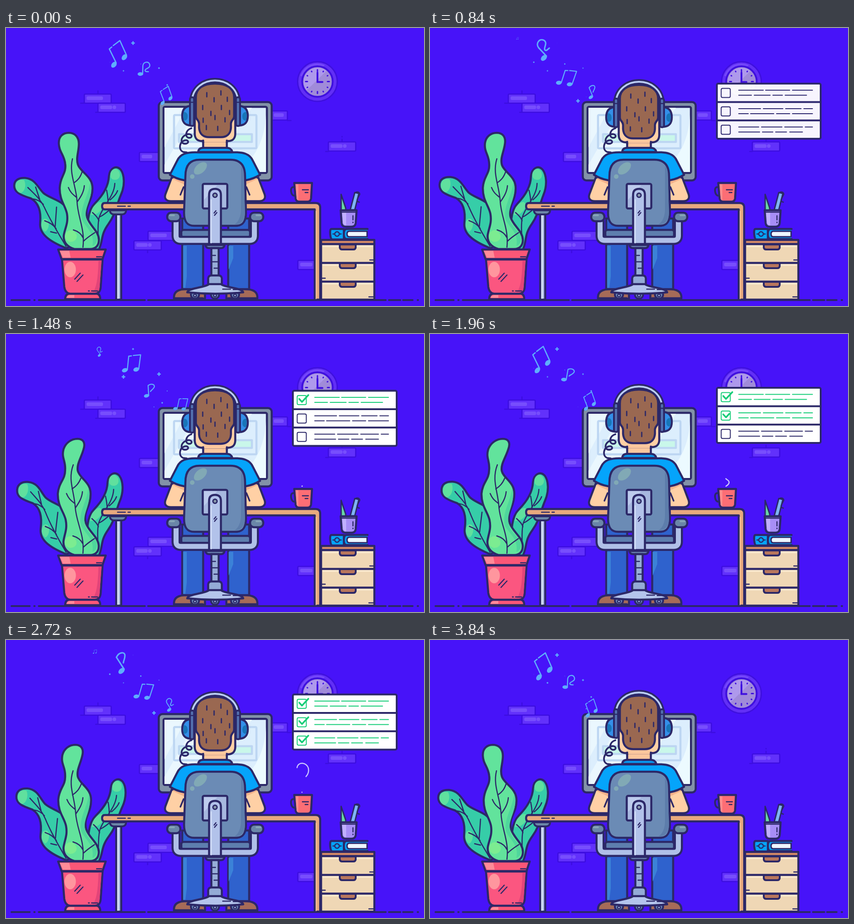
An HTML page for the animation above (3.88 s loop, 918 px wide and 610 px high).

```html
<!DOCTYPE html>
<html lang="en">
<head>
<meta charset="utf-8">
<title>Desk work</title>
<style>
html,body{margin:0;width:100%;height:100%;overflow:hidden;background:#4713f9}
svg{display:block;width:918px;height:610px}
.ink{stroke:#2c2868;stroke-width:4.5;stroke-linejoin:round;stroke-linecap:round;fill:none}
.thin{stroke-width:2.5}
.flat{stroke:none}
.note{stroke:#5eaefc;stroke-width:2.4;fill:none;stroke-linecap:round;stroke-linejoin:round}
.note ellipse{fill:#5eaefc;stroke:none}
.spark{stroke:#5eaefc;fill:#5eaefc}
</style>
</head>
<body>
<svg viewBox="0 0 918 610">
<rect width="918" height="610" fill="#4713f9"/>
<g id="bricks" fill="#6231fb" stroke="#3c0de0" stroke-width="2.6" stroke-linecap="round"></g>

<g stroke="#3f10df" stroke-linecap="round">
  <circle cx="684" cy="117.500" r="43.500" fill="#622ff6" stroke-width="3"/>
  <path d="M646 105A40 40 0 0 1 700 81L693 92A27 27 0 0 0 659 108Z" fill="#7447fa" stroke="none"/>
  <circle cx="684" cy="117.500" r="33.500" fill="#a08bd9" stroke-width="4"/>
  <path d="M660 137A31 31 0 0 1 704 94Z" fill="#ae99ec" stroke="none"/>
  <g id="ticks" stroke-width="3"></g>
  <path d="M684 98V118.500H695" fill="none" stroke-width="4"/>
</g>

<g class="ink">
  <path d="M12 597H52M62 597h1M72 597H305M312 597H834M841 597H866M872 597H893M904 597h1" stroke-width="4"/>
  <rect x="335.500" y="162.500" width="248" height="172" rx="8" fill="#8292a8"/>
  <rect x="346" y="173" width="227" height="145" rx="3" fill="#dceefd"/>
  <path class="flat" d="M348 175H395L348 262ZM348 300L420 175H540L445 316H348Z" fill="#eaf7fe"/>
  <path class="flat" d="M571 190V316H505C545 290 568 250 571 190Z" fill="#ecfaff"/>
  <g stroke="#bdd6f2"><rect x="369" y="191" width="181" height="73" rx="2"/>
  <rect x="380" y="233" width="160" height="17" fill="#c9f7ea"/></g>
</g>

<g id="notes"></g>
<g id="sparks" class="spark"></g>

<g class="ink">
  <path d="M407 220C394 224 392 240 402 241C412 241 408 229 396 234C382 240 383 254 393 254C404 254 401 243 391 247C380 252 379 268 389 272L397 273" stroke-width="3.800"/>
  <g id="arm"><path d="M364 328L350 365C347 374 352 380 362 380H398V330Z" fill="#ffd0a5"/>
  <path class="flat" d="M367 332L391 343V334L368 327Z" fill="#f3b28b"/>
  <path d="M390 349L383 366" stroke-width="3.500"/></g>
  <use href="#arm" transform="matrix(-1 0 0 1 918 0)"/>
  <path d="M433 240V270H485V240Z" fill="#fcc79d"/>
  <path d="M425 273C396 271 382 277 376 291L360 322Q374 331 391 334H527Q544 331 558 322L542 291C536 277 522 271 493 273Z" fill="#05a4fb"/>
  <path d="M422 272Q423 263 433 263H485Q495 263 497 272Z" fill="#0798f0"/>

  <g id="head">
    <path d="M414.500 190V233C415 242 420 248 430 248H488C498 248 503 242 503.500 233V190Z" fill="#ffd0a5"/>
    <path class="flat" d="M433 250H485V240H433Z" fill="#fcc79d"/>
    <path d="M433 247V252M485 247V252"/>
    <path d="M417 152C417 132 434 122 459 122S501 132 501 152V194C501 201 494 202 494 210V219C493 233 484 239.500 472 239.500H446C434 239.500 425 233 424 219V210C424 202 417 201 417 194Z" fill="#9a6851"/>
    <path id="hair" stroke-width="2.800"/>
    <path d="M408 161C412 100 506 100 510 161" stroke-width="11.500"/>
    <path d="M408 161C412 100 506 100 510 161" stroke="#bccff4" stroke-width="4"/>
    <g id="cup"><path d="M405 171C392 172 387 180 387 193S392 213 405 214Z" fill="#348fe9"/>
    <path class="flat" d="M390 184Q399 184 399 194T390 203Z" fill="#1875b8"/>
    <rect x="404" y="152" width="9" height="63" rx="4" fill="#526fae" stroke-width="4"/>
    <path d="M406 163H411" stroke-width="2.500"/></g>
    <use href="#cup" transform="matrix(-1 0 0 1 918 0)"/>
  </g>
</g>

<g class="ink">
  <g id="leg"><path d="M369 594V589C370 577 382 573 396 573H437V594Z" fill="#a66b58"/>
  <path d="M387 418H433V573H387Z" fill="#2f62cd"/></g>
  <use href="#leg" transform="matrix(-1 0 0 1 921 0)"/>
  <path class="flat" d="M389 478H397V545L394 570H389ZM489 478H499V505L489 530Z" fill="#3b82d8"/>
  <path d="M369 593H432M488 593H550"/>
</g>

<g class="ink" id="plant">
  <g data-bend="right">
    <path d="M204 486C214 465 207 455 225 430C240 410 243 388 252 367C262 345 260 322 252 311C242 300 228 307 226 325C225 350 210 370 195 385C180 400 176 425 182 486Z" fill="#36cda8"/>
    <path class="flat" d="M229 321C231 308 243 305 249 316C253 327 246 334 238 333C231 332 229 328 229 321ZM197 387C206 378 214 381 212 391C209 405 195 412 186 410C187 400 190 393 197 387Z" fill="#60e09e"/>
    <path class="thin" d="M239 341C238 370 210 393 204 418C200 440 204 455 201 478M245 357C241 368 233 373 229 377M221 356C223 366 224 373 224 382M190 405C197 411 202 416 204 423M231 396C222 404 215 410 207 414"/>
  </g>
  <g data-bend="left">
    <path d="M132 483C95 468 73 452 75 428C77 408 74 385 55 374C30 366 18 360 18 346C18 334 28 328 42 329C64 331 70 350 82 362C98 376 130 378 137 405C140 425 126 440 140 480Z" fill="#36cda8"/>
    <path class="flat" d="M21 346C22 335 31 331 40 334C46 348 39 362 31 362C24 359 21 353 21 346ZM78 428C79 419 86 416 91 421C97 429 93 444 86 447C79 442 77 436 78 428Z" fill="#60e09e"/>
    <path class="thin" d="M48 350C65 367 75 375 84 393C95 417 110 443 132 479M65 349C68 358 71 367 74 376M59 375C68 376 75 380 82 387M111 393C110 410 109 420 108 436M85 423C96 427 103 431 110 440M111 450C105 449 102 448 98 447"/>
  </g>
  <g data-bend="mid">
    <path d="M150 485C135 480 125 470 127 454C130 438 137 428 134 408C131 390 117 378 118 350C119 325 133 320 130 298C128 278 116 272 116 252C116 238 125 230 138 230C152 230 160 240 160 254C160 272 153 285 158 300C164 317 190 325 190 352C190 380 172 390 178 415C184 435 204 445 204 465C204 478 196 485 185 485Z" fill="#62e39c"/>
    <path class="flat" d="M185 338C181 370 160 395 168 422C177 440 195 450 190 478C200 474 203 462 198 454C190 440 176 432 175 412C174 392 188 376 187 352C187 346 186 341 185 338Z" fill="#4fd69c"/>
    <path class="flat" d="M130 455C132 443 145 440 152 449C161 460 151 471 139 469C132 466 129 462 130 455Z" fill="#7cec91"/>
    <path class="thin" d="M146 287C138 320 154 345 156 380C157 415 174 440 169 481M167 316C163 328 158 334 149 340M137 350C142 362 147 365 154 371M172 346C171 360 164 371 156 382M148 443C158 446 165 451 169 460M195 449C186 455 178 460 170 468"/>
  </g>
</g>

<g class="ink">
  <path d="M130 595Q130 583 140 583H198Q207 583 207 595Z" fill="#fb5777"/>
  <path d="M123 508L128 568Q130 582 141 583H196Q207 582 208 568L212 508Z" fill="#fb5680"/>
  <path class="flat" d="M203 510H210L205 574Q203 581 190 580Q202 570 203 510Z" fill="#e34479"/>
  <ellipse class="flat" cx="141" cy="530" rx="12.500" ry="17" fill="#ff969e"/>
  <path d="M114.500 486H219L212 507H122Z" fill="#fb5777"/>
  <path class="flat" d="M118 489H139L142 504H125ZM133 592Q134 587 141 586H150V592Z" fill="#ff8b98"/>
  <path class="thin" d="M151 551L163 538M156 556L169 542M199 502H210M181 577H183M188 577H201"/>
</g>

<g class="ink">
  <rect x="242" y="404" width="11" height="192" fill="#aebde5"/>
  <path class="flat" d="M244.500 410H247.500V594H244.500Z" fill="#dce5fb"/>
  <path d="M228 400H264Q263 409 255 409H237Q229 409 228 400Z" fill="#6c87a8" stroke-width="4"/>
  <path d="M217 384H680Q690 384 690 394V596H678V398H217Q211 398 211 391T217 384Z" fill="#e8a97e"/>
  <path d="M681 402V594" stroke="#f4c49b" stroke-width="2"/>
  <path class="thin" d="M245 391H262M268 391H273"/>

  <path d="M632 349Q625 349 626 358T633 368" stroke-width="4"/>
  <path d="M633 340H672L670 374Q669 381 662 381H644Q637 381 636 374Z" fill="#fc6e75"/>
  <path class="flat" d="M636 343H642V378Q638 377 638 371Z" fill="#ff8d8d"/>
  <path class="thin" d="M651 355H664M657 361H663"/>

  <rect x="692" y="474" width="117" height="122" fill="#efd7b5"/>
  <path class="flat" d="M695 477H806V481H695ZM695 518H806V522H695ZM695 559H806V563H695Z" fill="#fae8cc"/>
  <path d="M692 515.500H809M692 556.500H809"/>
  <rect x="692" y="465" width="117" height="9" fill="#d58a66"/>
  <path d="M733 475H768V482Q767 486 763 486H738Q734 486 733 482ZM733 516H768V523Q767 527 763 527H738Q734 527 733 523ZM733 557H768V564Q767 568 763 568H738Q734 568 733 564Z" fill="#b9775d" stroke-width="4"/>
  <path class="thin" d="M694 549H701M799 509H807M797 590H807"/>

  <path d="M742 441H715Q711 441 712 452T716 464H742Z" fill="#05a4fb"/>
  <path d="M794 441H748Q742 441 742 452T748 463H794" fill="#08a0f4"/>
  <path d="M793 446H754Q749 446 749 452T754 458H793Z" fill="#eef6ff" stroke-width="3"/>
  <path class="thin" d="M727 447Q722 448 722 452T727 457Q732 456 732 452T727 447M718 452H721M733 452H736"/>
  <path d="M736 400L736 365L746 395V400Z" fill="#69d8a5" stroke-width="3"/>
  <path d="M756 399L766 361L775 363L766 399Z" fill="#7fb5f4" stroke-width="3"/>
  <path d="M769 360Q777 359 777 365L771 377Q772 382 776 382" stroke-width="2.500"/>
  <path d="M735 400H770L768 428Q767 436 759 436H746Q738 436 737 428Z" fill="#a78ef6"/>
  <path class="flat" d="M738 405H747V433Q740 432 740 426Z" fill="#c1b0ff"/>
  <path class="thin" d="M737 404H768M762 412V421M762 426V427"/>
</g>

<g class="ink">
  <rect x="385" y="443" width="151" height="16" rx="5" fill="#5e7eae"/>
  <path d="M373.500 424V456Q373.500 466 384 466H535Q545.500 466 545.500 456V424" stroke-width="20"/>
  <path d="M373.500 424V456Q373.500 466 384 466H535Q545.500 466 545.500 456V424" stroke="#b0c0e8" stroke-width="11"/>
  <g id="pad"><rect x="354" y="405" width="29" height="19" rx="9" fill="#6a86a8"/>
  <path d="M360 411H369" stroke="#86a5b8" stroke-width="4"/></g>
  <use href="#pad" transform="matrix(-1 0 0 1 919 0)"/>
  <path d="M394 325C394 300 405 289 425 289H493C516 289 525 303 525 325L527 405C527 425 520 434 505 434H413C398 434 391 425 391 405Z" fill="#6b8bb5"/>
  <path class="flat" d="M516 303Q523 312 522 330L525 405Q524 431 502 431Q517 420 516 395Z" fill="#5d7dab"/>
  <ellipse class="flat" cx="427" cy="308" rx="17" ry="10" transform="rotate(-42 427 308)" fill="#81a9b5"/>
  <circle class="flat" cx="409" cy="326" r="5" fill="#81a9b5"/>
  <rect x="432" y="342" width="54" height="54" rx="3" fill="#a7b8df"/>
  <path class="flat" d="M435 345H464L435 377Z" fill="#bdcbed"/>
  <path d="M438 476H480Q479 483 472 483H446Q439 483 438 476Z" fill="#6b84b0"/>
  <path d="M451 483H467V544H451Z" fill="#97add7"/>
  <path class="thin" d="M452 499H460M453 513H466M457 527H466"/>
  <path d="M444 563V549Q445 543 451 543H467Q473 543 474 549V563Z" fill="#94abd6"/>
  <g fill="#6480b0" stroke-width="4"><circle cx="415" cy="585" r="9"/><circle cx="459" cy="585" r="9"/><circle cx="503" cy="585" r="9"/></g>
  <path d="M398 580C400 570 437 570 446 562H472C481 570 519 570 521 580Q460 586 398 580Z" fill="#b4c4ec"/>
  <g class="thin" fill="#a5b8df"><circle cx="415" cy="587" r="3"/><circle cx="459" cy="587" r="3"/><circle cx="503" cy="587" r="3"/></g>
  <path class="thin" d="M476 573H493M499 574H514"/>
  <path d="M446 474V366Q446 353 459 353T472 366V474Z" fill="#b2c2ea"/>
  <path d="M450.500 377V471" stroke="#cfdbf6" stroke-width="3"/>
  <circle cx="459" cy="367" r="4.500" fill="#8797aa" stroke-width="3"/>
  <path class="thin" d="M457 406L461 401M458 411L463 405"/>
</g>

<path id="steam" d="M650 334C658 329 659 324 653 320C643 314 648 306 655 303C662 298 666 290 664 281C660 268 641 266 639 281C638 290 652 290 650 277" pathLength="100" fill="none" stroke="#c9c4ff" stroke-width="2.500" stroke-linecap="round"/>
<g id="list" class="ink"><rect x="630" y="0" width="228" height="121" rx="3" fill="#fff" stroke-width="4"/></g>
</svg>

<script>
const LOOP = 3880, HALF = LOOP / 2, TAU = Math.PI * 2;
const INK = [44, 40, 104], GREEN = [22, 205, 120];
const $ = id => document.getElementById(id);
const clamp = (v, a = 0, b = 1) => Math.min(b, Math.max(a, v));
const mod = (v, n) => ((v % n) + n) % n;

function add(parent, tag, attrs, html = '') {
  const el = document.createElementNS('http://www.w3.org/2000/svg', tag);
  for (const k in attrs) el.setAttribute(k, attrs[k]);
  el.innerHTML = html;
  return parent.appendChild(el);
}

// Rows are [time, values...]; smooth rows join with Hermite curves.
function track(rows, t, smooth = true) {
  const n = rows.length - 1;
  if (t <= rows[0][0]) return rows[0].slice(1);
  if (t >= rows[n][0]) return rows[n].slice(1);
  const i = rows.findIndex(r => r[0] > t) - 1;
  const a = rows[i], b = rows[i + 1], span = b[0] - a[0], u = (t - a[0]) / span;
  const slope = (j, k) => {
    const p = rows[Math.max(0, j - 1)], q = rows[Math.min(n, j + 1)];
    return (q[k] - p[k]) / (q[0] - p[0]) * span;
  };
  return a.slice(1).map((v, j) => {
    const k = j + 1, d = b[k] - v;
    if (!smooth) return v + d * u;
    const m = slope(i, k), w = slope(i + 1, k);
    return v + m * u + (3 * d - 2 * m - w) * u * u + (m + w - 2 * d) * u ** 3;
  });
}

// Bricks: x, y, width, highlight width, dot
[[172, 145, 59, 36, 0], [202, 165, 60, 26, 1], [583, 182, 35, 22, 0], [708, 250, 60, 26, 1],
 [293, 273, 44, 23, 0], [312, 446, 58, 36, 0], [281, 467, 60, 25, 1], [641, 510, 42, 27, 0]]
.forEach(([x, y, w, h, dot]) => {
  add($('bricks'), 'rect', {x, y, width: w, height: 20, rx: 2});
  add($('bricks'), 'rect', {x: x + 5, y: y + 5, width: h, height: 8, rx: 3, fill: '#774efd', stroke: 'none'});
  if (dot) add($('bricks'), 'circle', {cx: x + h + 10, cy: y + 9, r: 4, fill: '#774efd', stroke: 'none'});
});
add($('bricks'), 'path', {d: 'M164 165H172M202 138V145M197 185H202M618 203H626M738 238V239M738 244V249M702 271H708M311 488V493'});

for (let i = 0; i < 12; i++) {
  const len = i % 3 ? 1 : 4;
  add($('ticks'), 'path', {d: `M684 ${91.500}v${len}`, transform: `rotate(${i * 30} 684 117.500)`});
}

$('hair').setAttribute('d', [[441, 142], [472, 138], [457, 153], [486, 152], [432, 170], [473, 170],
  [450, 183], [491, 181], [433, 198], [481, 197], [459, 192], [440, 214], [465, 216]]
  .map(([x, y]) => `M${x} ${y}v9`).join(''));

// Music notes
const beamed = '<ellipse cx="-14.500" cy="17" rx="6.500" ry="4.500" transform="rotate(-20 -14.500 17)"/><ellipse cx="10.500" cy="14.500" rx="6.500" ry="4.500" transform="rotate(-20 10.500 14.500)"/><path d="M-9 16L-7-14L-1-15M3-16L19-18L16 13"/>';
const headDot = '<ellipse cx="-5" cy="14" rx="6" ry="4" transform="rotate(-20 -5 14)"/>';
const flag = headDot + '<path d="M0 13L-4-10C4-17 13-13 10-7C8-2 5-1 3 3"/>';
const curl = headDot + '<path d="M0 13L-6-5C-8-14 2-19 7-13C12-6 2-2 2 2C2 6 7 4 10 3"/>';
const beamPath = [[0, 400, 170, 15, 0], [450, 390, 159, 11, .7], [590, 384, 153, 8, .72],
  [1060, 348, 147, -25, .8], [1850, 302, 110, 13, .95], [2390, 284, 71, 7, 1],
  [2530, 276, 63, 2, 1], [3000, 241, 55.5, -30, 1.12], [3800, 193.5, 24, 0, .18], [3880, 190, 20, 0, 0]];
const flagPath = [[0, 392, 165, -30, 0], [430, 357, 140, -14, .85], [1030, 317.5, 126.5, 4, .95],
  [1570, 304, 89, 20, 1], [2370, 250.5, 47, -24, 1.32], [2970, 208.5, 40, -20, .68], [3480, 192, 20, 0, 0]];
const notes = [[beamed, beamPath, 890], [beamed, beamPath, 2830], [flag, flagPath, 380], [curl, flagPath, 2320]]
  .map(([art, path, birth]) => ({el: add($('notes'), 'g', {class: 'note'}, art), path, birth}));

// Sparkles: x, y, peak time, plus or dot
const sparks = [[279, 33, 0, 1], [336, 88, 1440, 1], [325, 160, 820, 1], [258, 94, 1400, 1],
  [228, 75, 650, 0], [296, 79, 560, 0], [343, 151, 1500, 0], [354, 125, 0, 0]]
  .map(([x, y, peak, plus]) => ({x, y, peak, el: plus
    ? add($('sparks'), 'path', {d: 'M-4 0H4M0-4V4', 'stroke-width': 2.6})
    : add($('sparks'), 'circle', {r: 1.7, stroke: 'none'})}));

// Checklist: start of tick, then dash ends for both text lines
const rows = [
  [1100, 'M678 14.500H732M737 14.500H790M796 14.500H840M678 25.500H706M712 25.500H747M753 25.500H774M780 25.500H827'],
  [1760, 'M678 14.500H726M732 14.500H775M781 14.500H815M821 14.500H840M678 25.500H699M704 25.500H755M761 25.500H790M796 25.500H840'],
  [2260, 'M678 14.500H722M728 14.500H773M779 14.500H818M824 14.500H840M678 25.500H724M730 25.500H753M759 25.500H783M790 25.500H818']
].map(([start, d], i) => {
  const g = add($('list'), 'g', {transform: `translate(0 ${i * 40.4})`});
  if (i) add(g, 'path', {d: 'M630 0H858', 'stroke-width': 4});
  const lines = add(g, 'g', {'stroke-width': 2});
  add(lines, 'rect', {x: 639.5, y: 10.5, width: 20, height: 20, rx: 3});
  add(lines, 'path', {d});
  const tick = add(g, 'path', {d: 'M644 18L650 24.500L664 9.500', pathLength: 100, 'stroke-width': 3.6, stroke: '#16cd78'});
  return {start, lines, tick};
});
const listPath = [[400, 150, 0], [860, 121.5, 1], [1480, 124.5, 1], [1960, 118, 1],
  [2720, 119.5, 1], [3000, 116, 1], [3280, 108, .65], [3600, 97, 0]];

// Plant: each leaf shifts its points by height
const bends = {
  mid(y, k) { const u = clamp((485 - y) / 235, 0, 1.1); return [65 * k * u * u * (u - .8), 0]; },
  left(y, k) { const u = clamp((485 - y) / 145); return [8 * k * u * u, -5 * k * u * u]; },
  right(y, k, s) { const u = clamp((485 - y) / 165); return [-4.5 * s * u, 0]; }
};
const leaves = [...document.querySelectorAll('[data-bend] path')].map(el =>
  ({el, d: el.getAttribute('d'), bend: bends[el.parentNode.dataset.bend]}));

const place = (el, x, y, r, s) => el.setAttribute('transform', `translate(${x} ${y}) rotate(${r}) scale(${Math.max(0, s)})`);

function dash(el, from, to) {
  el.style.visibility = to - from > .1 ? 'visible' : 'hidden';
  el.setAttribute('stroke-dasharray', `0 ${from} ${Math.max(0, to - from)} 200`);
}

function draw(t) {
  const a = TAU * t / LOOP, k = (1 - Math.cos(a)) / 2, s = Math.sin(a);
  for (const {el, d, bend} of leaves)
    el.setAttribute('d', d.replace(/([\d.]+) ([\d.]+)/g, (_, x, y) => {
      const [dx, dy] = bend(+y, k, s);
      return `${(+x + dx).toFixed(2)} ${(+y + dy).toFixed(2)}`;
    }));

  $('head').setAttribute('transform', `translate(0 ${1.5 * (1 - Math.cos(2 * a))})`);

  for (const {el, path, birth} of notes) place(el, ...track(path, mod(t - birth, LOOP)));
  for (const {el, x, y, peak} of sparks)
    place(el, x, y, 0, clamp(.53 + .5 * Math.cos(TAU * (t - peak) / HALF)));

  const [y] = track(listPath, t), [, alpha] = track(listPath, t, false);
  $('list').setAttribute('transform', `translate(0 ${y})`);
  $('list').setAttribute('opacity', alpha);
  for (const {start, lines, tick} of rows) {
    const g = clamp((t - start) / 160);
    lines.setAttribute('stroke', `rgb(${INK.map((c, i) => Math.round(c + (GREEN[i] - c) * g))})`);
    dash(tick, 0, 100 * clamp((t - start) / 300));
  }

  const [head] = track([[1440, 0], [1480, .5], [1960, 18], [2720, 81], [3000, 100]], t, false);
  const [tail] = track([[1960, 0], [2720, 37], [3280, 97.5], [3320, 100]], t, false);
  dash($('steam'), tail, head);
}

const start = performance.now();
function tick() {
  draw(Math.floor(mod(performance.now() - start, LOOP) / 40) * 40);
  requestAnimationFrame(tick);
}
tick();
</script>
</body>
</html>
```
